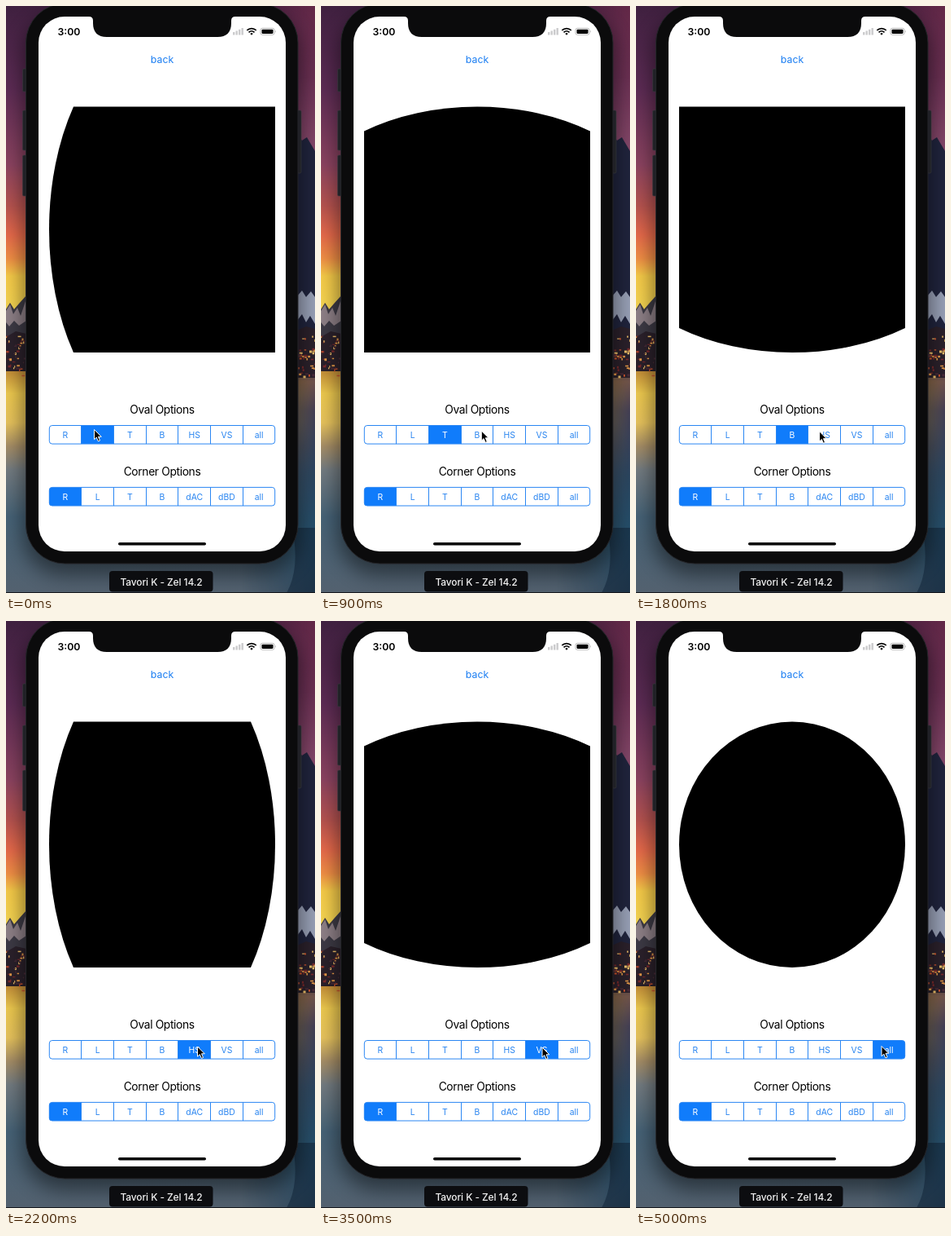
Write an HTML page that moves like this. It is 380 by 720 pixels and loops after 5.1 s.

```html
<!DOCTYPE html>
<html lang="en">
<head>
<meta charset="utf-8">
<title>Oval and corner options</title>
<style>
  html, body { margin: 0; width: 100%; height: 100%; overflow: hidden; background: #000; }
  svg { display: block; width: 380px; height: 720px; }
  text { font-family: Inter, "Liberation Sans", sans-serif; text-anchor: middle; }
  .title { font-size: 13.8px; letter-spacing: -.35px; }
  .seg text { font-size: 10.4px; }
  .line { fill: none; stroke: #2a86f3; stroke-width: 1; }
</style>
</head>
<body>
<svg viewBox="0 0 380 720">
  <defs>
    <linearGradient id="west" x2="0" y2="1">
      <stop offset="0" stop-color="#3f203f"/>
      <stop offset=".14" stop-color="#5c2b54"/>
      <stop offset=".27" stop-color="#8b4360"/>
      <stop offset=".34" stop-color="#b6534f"/>
      <stop offset=".39" stop-color="#e5694a"/>
      <stop offset=".43" stop-color="#f08e45"/>
      <stop offset=".46" stop-color="#f5ca48"/>
      <stop offset=".52" stop-color="#f4d552"/>
      <stop offset=".62" stop-color="#c08a36"/>
      <stop offset=".66" stop-color="#ecc84e"/>
      <stop offset=".71" stop-color="#e6c25c"/>
      <stop offset=".75" stop-color="#a58d66"/>
      <stop offset=".79" stop-color="#737b80"/>
      <stop offset=".87" stop-color="#466276"/>
      <stop offset="1" stop-color="#53616f"/>
    </linearGradient>
    <linearGradient id="east" x2="0" y2="1">
      <stop offset="0" stop-color="#632847"/>
      <stop offset=".12" stop-color="#6b3052"/>
      <stop offset=".24" stop-color="#84486a"/>
      <stop offset=".6" stop-color="#2a2c43"/>
      <stop offset=".64" stop-color="#70534c"/>
      <stop offset=".69" stop-color="#433f56"/>
      <stop offset=".8" stop-color="#2a4560"/>
      <stop offset=".9" stop-color="#24506c"/>
      <stop offset="1" stop-color="#2a4358"/>
    </linearGradient>
    <linearGradient id="fade">
      <stop offset="0" stop-color="#000"/>
      <stop offset="1" stop-color="#fff"/>
    </linearGradient>
    <mask id="eastMask"><rect x="290" width="90" height="720" fill="url(#fade)"/></mask>
    <filter id="soft" x="-20%" y="-20%" width="140%" height="140%">
      <feGaussianBlur stdDeviation="12"/>
    </filter>
  </defs>

  <rect width="380" height="720" fill="url(#west)"/>
  <rect x="290" width="90" height="720" fill="url(#east)" mask="url(#eastMask)"/>
  <path d="M0 372 5 364 10 372 16 365 25 355V446H0Z" fill="#3d3a45"/>
  <path d="M0 374 5 366 9 378 14 370 18 380 25 359V386L16 392 10 386 4 393 0 388Z" fill="#8d7f86"/>
  <path d="M358 157 364 165 370 161 380 178V456H358Z" fill="#20243d"/>
  <path d="M358 356 364 349 369 357 375 350 380 357V390L374 380 369 388 364 378 358 386Z" fill="#98a0b6"/>
  <path d="M0 406 12 399 25 402V448H0ZM358 398 369 393 380 396V456H358Z" fill="#2b212b"/>
  <g id="lights"></g>
  <path d="M352 640Q362 690 345 720H380V640Z" fill="#14283d" opacity=".6"/>
  <rect x="20" y="10" width="343" height="688" rx="50" opacity=".45" filter="url(#soft)"/>

  <g fill="#202126" stroke="#38393e" stroke-width=".6">
    <rect x="20.5" y="77" width="6" height="28" rx="1.5"/>
    <rect x="20.5" y="128" width="6" height="49" rx="1.5"/>
    <rect x="20.5" y="183" width="6" height="50" rx="1.5"/>
    <rect x="357" y="128" width="6" height="77" rx="1.5"/>
  </g>
  <rect x="24.5" y="-3" width="334.500" height="687" rx="48" fill="#0b0b0c" stroke="#242529"/>
  <rect x="40" y="13" width="304" height="656" rx="32" fill="#fff"/>
  <path d="M102 12V13Q107 13 107 18V21Q107 38 124 38H260Q277 38 277 21V18Q277 13 282 13V12Z" fill="#0b0b0c"/>

  <text x="77.500" y="36" font-size="12.3" font-weight="600">3:00</text>
  <path d="M279 32h2.400v3.500h-2.400zM282.500 30.500h2.400v5h-2.400zM286 28.700h2.400v6.800h-2.400zM289.500 27h2.400v8.500h-2.400z" fill="#cbcbcd"/>
  <g fill="none" stroke="#000" stroke-width="1.700">
    <path d="M296.300 29.900a8.200 8.200 0 0 1 11.400 0M298.500 32.300a5 5 0 0 1 7 0"/>
    <path d="M302 35.700 300.300 33.900a2.400 2.400 0 0 1 3.400 0Z" fill="#000" stroke="none"/>
  </g>
  <rect x="313" y="27.300" width="17" height="8" rx="2.200" fill="none" stroke="#aaa" stroke-width=".8"/>
  <rect x="314.500" y="28.700" width="14" height="5.200" rx="1.100"/>
  <path d="M331.300 29.800q1.400 1.500 0 3z" fill="#aaa"/>

  <text x="192" y="70" font-size="12.3" fill="#1b7ef2">back</text>
  <path id="shape"/>
  <text class="title" x="192" y="500.300">Oval Options</text>
  <text class="title" x="192" y="576.300">Corner Options</text>
  <g id="oval" class="seg"></g>
  <g id="corner" class="seg"></g>
  <rect x="138" y="658" width="108" height="3.600" rx="1.800"/>

  <rect x="127" y="693" width="127.500" height="25.500" rx="4" fill="#0c0d10"/>
  <text x="191" y="711" font-size="12" font-weight="500" fill="#f2f2f2" letter-spacing="-.1">Tavori K - Zel 14.2</text>
  <rect y="719" width="380" height="1" fill="#15171c"/>

  <path id="cursor" d="M0 0V12.200L2.800 9.600 4.900 14.400 7 13.500 5 8.800H8.800Z" stroke="#fff" stroke-width="1" stroke-linejoin="round"/>
</svg>
<script>
  const $ = id => document.getElementById(id);
  const LOOP = 5100, STEP = 100;
  const L = 53, R = 331, T = 123.5, B = 425, BULGE = 30;
  const rx = (R - L) / 2, ry = (B - T) / 2, midY = (T + B) / 2;

  function add(parent, tag, attrs, text) {
    const el = document.createElementNS(parent.namespaceURI, tag);
    for (const key in attrs) el.setAttribute(key, attrs[key]);
    if (text) el.textContent = text;
    return parent.appendChild(el);
  }

  // A rectangle whose chosen sides (any of "RLTB") are arcs of a larger oval:
  // 5/3 as long as the side, so the arc rises a fifth of the other radius.
  function bulged(sides) {
    const inset = s => sides.includes(s) ? BULGE : 0;
    const l = L + inset("L"), r = R - inset("R"), t = T + inset("T"), b = B - inset("B");
    const side = (s, ax, ay, x, y) => sides.includes(s) ? `A${ax} ${ay} 0 0 1 ${x} ${y}` : `L${x} ${y}`;
    const wide = rx * 5 / 3, tall = ry * 5 / 3, depth = BULGE * 5;
    return `M${l} ${t}` + side("T", wide, depth, r, t) + side("R", depth, tall, r, b) +
      side("B", wide, depth, l, b) + side("L", depth, tall, l, t) + "Z";
  }

  const ellipse = `M${L} ${midY}A${rx} ${ry} 0 1 1 ${R} ${midY}A${rx} ${ry} 0 1 1 ${L} ${midY}Z`;
  const shapes = [..."RLTB", "RL", "TB"].map(bulged).concat(ellipse);

  function segments(id, y, labels) {
    const group = $(id), w = (R - L) / labels.length, h = 22.6;
    const parts = labels.map((label, i) => {
      const x = L + i * w, last = labels.length - 1;
      const a = i === 0 ? 3.5 : 0, b = i === last ? 3.5 : 0;
      const fill = add(group, "path", {
        d: `M${x + a} ${y}h${w - a - b}q${b} 0 ${b} ${b}v${h - 2 * b}q0 ${b} ${-b} ${b}` +
           `h${a + b - w}q${-a} 0 ${-a} ${-a}v${2 * a - h}q0 ${-a} ${a} ${-a}Z`,
        fill: "#107cfb"
      });
      const text = add(group, "text", { x: x + w / 2, y: y + 15.1 }, label);
      if (i) add(group, "path", { class: "line", d: `M${Math.floor(x) + 0.5} ${y}v${h}` });
      return { fill, text };
    });
    add(group, "rect", { class: "line", x: L + 0.3, y, width: R - L - 0.6, height: h, rx: 3.5 });
    return levels => parts.forEach(({ fill, text }, i) => {
      const k = levels[i] || 0;
      const mix = c => Math.round(c + (255 - c) * k);
      fill.setAttribute("opacity", k);
      text.setAttribute("fill", `rgb(${mix(40)},${mix(132)},${mix(240)})`);
    });
  }

  const setOval = segments("oval", 514.5, ["R", "L", "T", "B", "HS", "VS", "all"]);
  const setCorner = segments("corner", 590.4, ["R", "L", "T", "B", "dAC", "dBD", "all"]);
  setCorner([1]);

  let seed = 11;
  const rand = () => (seed = seed * 16807 % 2147483647) / 2147483647;
  const glow = ["#c8532f", "#e69a48", "#7c2a2c", "#f4c46a", "#4a2c38"];
  for (let i = 0; i < 80; i++) {
    add($("lights"), "rect", {
      x: (i % 2 ? 358 : 0) + rand() * 23, y: 404 + rand() * 50,
      width: 1 + rand() * 3, height: 1 + rand() * 2,
      fill: glow[Math.floor(rand() * glow.length)]
    });
  }

  // [time, selected segment]
  const taps = [[-900, 1], [500, 2], [1400, 3], [2100, 4], [3100, 5], [4600, 6]];
  // [time, x, y] of the pointer tip
  const trail = [
    [0, 108.5, 519.5], [200, 109, 520], [400, 152, 521], [600, 152, 521], [900, 197.3, 521],
    [1400, 196.5, 521.5], [1600, 197, 521.5], [1900, 235.5, 522], [2400, 235.5, 522],
    [2800, 272, 523], [3700, 272, 523], [4100, 304, 522], [4300, 304, 522], [4600, 302, 521.5], [LOOP, 302, 521.5]
  ];

  function pointer(t) {
    const i = trail.findIndex(p => p[0] > t);
    const [t0, x0, y0] = trail[i - 1], [t1, x1, y1] = trail[i];
    const u = (t - t0) / (t1 - t0), k = u * u * (3 - 2 * u);
    return [x0 + (x1 - x0) * k, y0 + (y1 - y0) * k];
  }

  function draw(t) {
    let n = taps.length - 1;
    while (taps[n][0] > t) n--;
    const [at, now] = taps[n];
    const k = Math.min(1, (t - at + 100) / 200);
    const levels = [];
    if (n) levels[taps[n - 1][1]] = k < 1 ? 0.62 : 0;
    levels[now] = k;
    setOval(levels);
    $("shape").setAttribute("d", shapes[now]);
    $("cursor").setAttribute("transform", `translate(${pointer(t)})`);
  }

  const start = performance.now();
  function tick() {
    const t = (performance.now() - start) % LOOP;
    draw(Math.floor(t / STEP) * STEP);
    requestAnimationFrame(tick);
  }
  tick();
</script>
</body>
</html>
```
